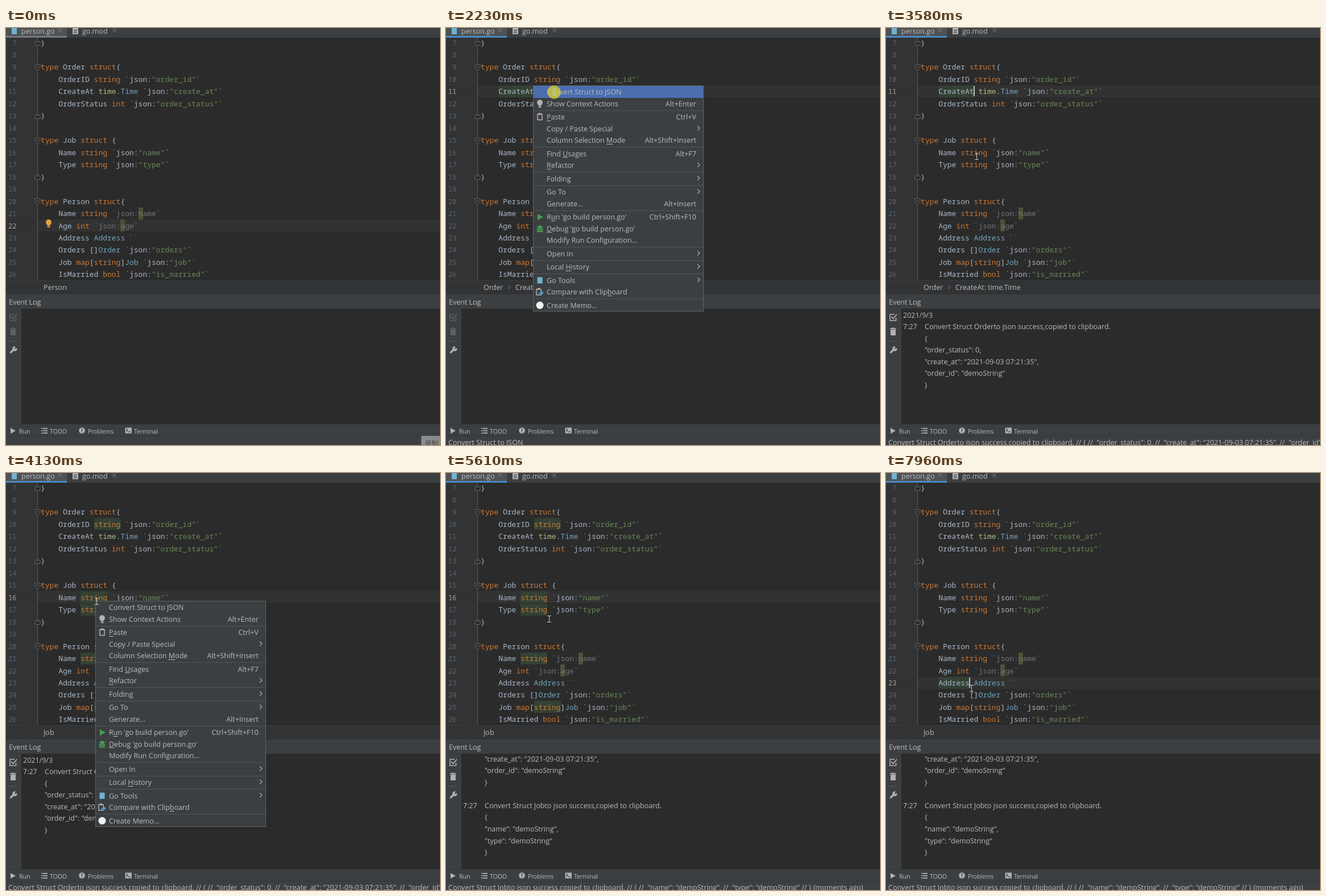
Recreate the animation shown at these times as an HTML page with a canvas. Size 763x734 px, loop 8000 ms.

```html
<!DOCTYPE html>
<html lang="en">
<head>
<meta charset="utf-8">
<title>Struct to JSON</title>
<style>
html, body { margin: 0; width: 100%; height: 100%; overflow: hidden; background: #2b2b2b; }
canvas { display: block; width: 763px; height: 734px; }
</style>
</head>
<body>
<canvas id="stage" width="763" height="734"></canvas>
<script>
const ctx = document.getElementById('stage').getContext('2d');
const LOOP = 8000;
const UI = '"Open Sans", "Noto Sans", sans-serif';
const MONO = '"Noto Sans Mono", "DejaVu Sans Mono", monospace';
const CHAR = 7.8, ROW = 21.47, LEFT = 61;
const C = {
  edit: '#2b2b2b', gutter: '#313335', panel: '#3c3f41', row: '#323232', line: '#555759',
  text: '#bbbbbb', code: '#a9b7c6', key: '#cc7832', type: '#6fa6c0', pkg: '#afbf7e',
  str: '#6a8759', dim: '#72737a', num: '#606366', icon: '#afb1b3', off: '#5e6163',
  use: '#344134', sel: '#4b6eaf', green: '#499c54', mark: '#6fb3d2'
};

// ~ marks a type, ^ marks a package
const CODE = [
  '}', '',
  'type Order struct{',
  '    OrderID string `json:"order_id"`',
  '    CreateAt ^time.~Time `json:"create_at"`',
  '    OrderStatus int `json:"order_status"`',
  '}', '',
  'type Job struct {',
  '    Name string `json:"name"`',
  '    Type string `json:"type"`',
  '}', '',
  'type Person struct{',
  '    Name string `json:name`',
  '    Age int `json:age`',
  '    Address ~Address ``',
  '    Orders []~Order `json:"orders"`',
  '    Job map[string]~Job `json:"job"`',
  '    IsMarried bool `json:"is_married"`'
];
const KEYWORDS = /^(type|struct|string|int|bool|map)$/;

// label, shortcut (> is a submenu), icon, separator after
const MENU = [
  ['Convert Struct to JSON'],
  ['Show Context Actions', 'Alt+Enter', 'bulb', 1],
  ['_Paste', 'Ctrl+V', 'paste'],
  ['Copy / Paste Special', '>'],
  ['Column Selection _Mode', 'Alt+Shift+Insert', '', 1],
  ['Find _Usages', 'Alt+F7'],
  ['_Refactor', '>', '', 1],
  ['Folding', '>', '', 1],
  ['Go To', '>'],
  ['Generate...', 'Alt+Insert', '', 1],
  ["R_un 'go build person.go'", 'Ctrl+Shift+F10', 'run'],
  ["_Debug 'go build person.go'", '', 'bug'],
  ['Modify Run Configuration...', '', '', 1],
  ['Open In', '>', '', 1],
  ['Local _History', '>', '', 1],
  ['Go Tools', '>', 'blue'],
  ['Compare with Clip_board', '', 'compare', 1],
  ['Create Memo...', '', 'white']
];

const LOG = [
  '2021/9/3', 'Convert Struct Orderto json success,copied to clipboard.',
  '{', '"order_status": 0,', '"create_at": "2021-09-03 07:21:35",', '"order_id": "demoString"', '}', '',
  'Convert Struct Jobto json success,copied to clipboard.',
  '{', '"name": "demoString",', '"type": "demoString"', '}'
];
const HINT = 'Convert Struct to JSON';
const note = (from, to) => LOG.slice(from, to).join(' // ').replace(/ "(\w+":)/g, '  "$1') + ' (moments ago)';

// timelines: [start, value]
const CURRENT = [[0, 22], [1360, 11], [3860, 16], [7840, 23]];
const CRUMB = [[0, 'Person'], [1700, 'Order>CreateAt: time.Time'], [4060, 'Job']];
const STATUS = [[0, ''], [1830, HINT], [2370, note(1, 7)], [4460, HINT], [5140, note(8, 13)]];
const POPUP = [[0, null], [1760, [153, 101]], [2300, null], [4060, [157, 225]], [5070, null]];
const HOVER = [[0, 0], [1830, 1], [2370, 0], [4460, 1], [5140, 0]];
const LOGGED = [[0, 0], [2370, 7], [5140, 13]];
const CARET = [[0, 0], [2370, 1], [2840, 0], [3340, 1], [3860, 0], [5680, 1], [6170, 0],
  [6640, 1], [7170, 0], [7640, 1]];
const PRESS = [[0, 0], [1360, 1], [1500, 0], [1660, 1], [1800, 0], [2230, 1], [2370, 0],
  [3860, 1], [4130, 0], [4930, 1], [5110, 0], [7840, 1], [7950, 0]];
const PATH = [
  [0, 760, 744], [810, 163, 174], [1220, 155, 102], [1800, 155, 102], [2160, 190, 113],
  [3090, 190, 113], [3580, 159, 226], [4390, 159, 226], [4670, 189, 241], [5540, 190, 242],
  [5610, 181, 257], [6170, 148, 360], [6240, 148, 360], [6560, 131, 681], [6770, 185, 610],
  [7100, 185, 610], [7700, 150, 379], [8000, 150, 379]
];

function at(list, t) {
  let v = list[0][1];
  for (const [start, value] of list) if (t >= start) v = value;
  return v;
}

function pointer(t) {
  const i = PATH.findIndex(p => p[0] > t);
  const [t0, x0, y0] = PATH[i - 1], [t1, x1, y1] = PATH[i];
  const u = (t - t0) / (t1 - t0), e = u * (2 - u);
  return [Math.round(x0 + (x1 - x0) * e), Math.round(y0 + (y1 - y0) * e)];
}

const rowY = n => 26 + (n - 7) * ROW;
const rowTop = n => Math.round(rowY(n) - 11);

function rect(x, y, w, h, color) {
  ctx.fillStyle = color;
  ctx.fillRect(x, y, w, h);
}

function text(s, x, y, color = C.text, size = 12.5, align = 'left', font = UI) {
  ctx.font = `${size}px ${font}`;
  ctx.textAlign = align;
  ctx.fillStyle = color;
  ctx.fillText(s, x, Math.round(y + 4.5));
}

function shape(points, color, fill, width = 1) {
  ctx.beginPath();
  for (let i = 0; i < points.length; i += 2) ctx.lineTo(points[i], points[i + 1]);
  paint(color, fill, width);
}

function paint(color, fill, width = 1) {
  if (fill) {
    ctx.fillStyle = color;
    ctx.fill();
  } else {
    ctx.strokeStyle = color;
    ctx.lineWidth = width;
    ctx.stroke();
  }
}

function disc(x, y, r, color) {
  ctx.beginPath();
  ctx.arc(x, y, r, 0, Math.PI * 2);
  paint(color, true);
}

function frame(x, y, w, h, color, width = 1) {
  ctx.strokeStyle = color;
  ctx.lineWidth = width;
  ctx.strokeRect(x, y, w, h);
}

function cross(x, y) {
  shape([x - 3.5, y - 3.5, x + 3.5, y + 3.5], '#7f8284');
  shape([x + 3.5, y - 3.5, x - 3.5, y + 3.5], '#7f8284');
}

const icons = {
  bulb(x, y, color = C.icon) {
    disc(x, y - 2, 5, color);
    rect(x - 2.5, y + 2, 5, 2, color);
    rect(x - 2.5, y + 5, 5, 2, color);
  },
  paste(x, y) {
    frame(x - 4, y - 5, 8, 10, C.icon, 1.6);
    rect(x - 2.5, y - 7, 5, 3, C.icon);
  },
  run: (x, y) => shape([x - 4, y - 5.5, x + 6, y, x - 4, y + 5.5], C.green, true),
  bug(x, y) {
    for (const d of [-3.5, 0.5, 4.5]) rect(x - 6, y + d, 12, 1.3, C.green);
    disc(x, y - 3, 3, C.green);
    disc(x, y + 2, 4.3, C.green);
    rect(x - 2, y + 0.2, 4, 1, C.panel);
    rect(x - 2, y + 2.7, 4, 1, C.panel);
  },
  blue: (x, y) => rect(x - 4.5, y - 5.5, 9, 11, C.mark),
  compare(x, y) {
    frame(x - 6, y - 5, 8, 10, C.icon, 1.5);
    rect(x - 4, y - 7, 4, 3, C.icon);
    shape([x - 2, y + 1, x + 2, y + 1, x + 2, y - 3, x + 7, y + 1.5, x + 2, y + 6, x + 2, y + 3, x - 2, y + 3], '#4a9bd0', true);
  },
  white: (x, y) => disc(x, y, 6.5, '#f2f2f2')
};

function drawTabs(focused) {
  rect(0, 0, 763, 17, C.panel);
  rect(0, 0, 107, 14, '#4e5254');
  rect(0, 14, 107, 3, focused ? '#4a88c7' : '#747a80');
  rect(10, 0, 9, 11, C.mark);
  text('person.go', 27, 5);
  cross(95, 4);
  rect(117, 0, 10, 11, C.icon);
  for (const y of [3, 5.5, 8]) rect(119, y, 6, 1, C.panel);
  text('go.mod', 134, 5);
  cross(190.5, 4);
}

function drawFold(y, up) {
  const d = up ? -1 : 1;
  ctx.beginPath();
  [[51, -5], [60, -5], [60, 1], [55.5, 5], [51, 1]].forEach(([x, dy]) => ctx.lineTo(x, y + dy * d));
  ctx.closePath();
  paint(C.edit, true);
  paint('#626567', false);
  rect(53, y - 1.5, 5, 1, '#747779');
}

function mark(n, col, len, color) {
  rect(Math.round(LEFT + col * CHAR), rowTop(n), Math.round(len * CHAR), 21, color);
}

function drawTag(tag, x, y) {
  if (!tag.includes('"')) return text(tag, x, y, C.dim, 13, 'left', MONO);
  for (const part of tag.split(/(json:)/)) {
    text(part, x, y, part === 'json:' ? C.code : C.str, 13, 'left', MONO);
    x += part.length * CHAR;
  }
}

function drawCode(line, y) {
  let x = LEFT;
  for (let tok of line.match(/`.*`|[~^]?\w+|[^\w`~^]+/g) || []) {
    if (tok[0] === '`') {
      drawTag(tok, x, y);
      continue;
    }
    let color = KEYWORDS.test(tok) ? C.key : C.code;
    if (tok[0] === '~') color = C.type;
    if (tok[0] === '^') color = C.pkg;
    tok = tok.replace(/[~^]/, '');
    if (tok.trim()) text(tok, x, y, color, 13, 'left', MONO);
    x += tok.length * CHAR;
  }
}

function drawEditor(t) {
  const cur = at(CURRENT, t);
  ctx.save();
  ctx.beginPath();
  ctx.rect(0, 17, 763, 427);
  ctx.clip();
  rect(0, 17, 763, 427, C.edit);
  rect(0, 17, 55, 427, C.gutter);
  rect(0, rowTop(cur), 763, 21, C.row);
  rect(55, 17, 1, 427, C.line);

  mark(21, 22, 1, '#52503a');
  mark(22, 18, 1, '#52503a');
  if (cur === 11) mark(11, 4, 8, C.use);
  if (cur === 16) [[10, 12], [16, 9], [17, 9], [21, 9], [25, 12]].forEach(([n, col]) => mark(n, col, 6, C.use));
  if (cur === 23) mark(23, 4, 7, C.use);

  CODE.forEach((line, i) => {
    const n = i + 7, y = rowY(n);
    const color = n === cur ? '#a4a3a3' : n === 21 ? '#566a80' : C.num;
    text(n, 18.5, y, color, 12, 'right', MONO);
    if (line === '}') drawFold(Math.round(y) - 0.5, true);
    if (line.startsWith('type')) drawFold(Math.round(y) + 0.5, false);
    drawCode(line, y);
  });
  if (cur === 22) icons.bulb(75, 344, '#e8a33d');
  if (at(CARET, t)) rect(cur === 23 ? 146 : 154, rowTop(cur) + 1, 2, 18, '#bbbbbb');
  ctx.restore();
}

function drawCrumbs(t) {
  rect(0, 444, 763, 25, C.gutter);
  rect(0, 444, 763, 1, '#3a3c3e');
  const [owner, field] = at(CRUMB, t).split('>');
  text(owner, 66, 456.5);
  if (field) {
    shape([110, 454, 112.5, 457, 110, 460], '#7a7d7f');
    text(field, 122, 456.5);
  }
}

function drawLog(t) {
  const count = at(LOGGED, t), color = count ? C.icon : C.off;
  rect(0, 468, 763, 27, C.panel);
  rect(0, 468, 763, 1, '#323435');
  text('Event Log', 5, 482);
  rect(0, 494, 763, 203, C.panel);
  rect(27, 494, 736, 203, C.edit);

  shape([15, 504, 7, 504, 7, 515, 17.5, 515, 17.5, 510], color, false, 1.6);
  shape([9.5, 508, 12.5, 511.5, 19, 504], color, false, 1.8);
  rect(8, 531, 9, 10, color);
  rect(7, 528.5, 11, 1.8, color);
  rect(10.5, 527.5, 4, 1.5, color);
  rect(4, 551, 18, 1, C.line);
  shape([7.5, 572, 14, 565.5], C.icon, false, 3.4);
  disc(15.5, 564.5, 4.2, C.icon);
  shape([15, 565, 17, 559, 21, 563], C.panel, true);

  ctx.save();
  ctx.beginPath();
  ctx.rect(28, 495, 735, 202);
  ctx.clip();
  const top = count > 7 ? 421 : 505;
  LOG.slice(0, count).forEach((s, i) => {
    const y = top + i * 20.55;
    text(s, i ? 68 : 30, y);
    if (s.startsWith('Convert')) text('7:27', 30, y);
  });
  ctx.restore();
}

function drawBars(t) {
  rect(0, 697, 763, 37, C.panel);
  rect(0, 697, 763, 1, '#323435');
  rect(0, 718, 763, 1, '#333537');
  shape([8, 704, 17, 709, 8, 714], C.icon, true);
  text('Run', 23, 709.5, C.text, 10.5);
  for (const y of [704, 708, 712]) {
    rect(62, y, 2, 1.8, C.icon);
    rect(65, y, 8, 1.8, C.icon);
  }
  text('TODO', 77, 709.5, C.text, 10.7);
  disc(133.5, 708.5, 5.3, C.icon);
  rect(132.7, 705, 1.6, 4.5, C.panel);
  rect(132.7, 710.5, 1.6, 1.6, C.panel);
  text('Problems', 144, 709.5, C.text, 10.2);
  rect(209.5, 703.5, 11.5, 10, C.icon);
  shape([211.5, 705.5, 214, 708, 211.5, 710.5], C.panel, false, 1.3);
  rect(215, 710, 4, 1.3, C.panel);
  text('Terminal', 225, 709.5, C.text, 10.4);
  text(at(STATUS, t), 4, 729);
}

function drawLabel(label, x, y) {
  const i = label.indexOf('_'), s = label.replace('_', '');
  text(s, x, y);
  if (i < 0) return;
  const start = ctx.measureText(s.slice(0, i)).width;
  rect(x + start, Math.round(y + 6), ctx.measureText(s[i]).width, 1, C.text);
}

function drawMenu(t) {
  const pos = at(POPUP, t);
  if (!pos) return;
  const [mx, my] = pos;
  rect(mx, my, 300, 398, C.panel);
  frame(mx + 0.5, my + 0.5, 299, 397, '#616365');
  if (at(HOVER, t)) rect(mx + 1, my + 1, 298, 21, C.sel);
  let y = my + 11.7;
  for (const [label, keys, icon, gap] of MENU) {
    if (icon) icons[icon](mx + 12, y);
    drawLabel(label, mx + 24, y);
    if (keys === '>') shape([mx + 289, y - 5, mx + 293, y - 1, mx + 289, y + 3], C.icon, false, 1.2);
    else if (keys) text(keys, mx + 287, y, C.text, 12.6, 'right');
    if (gap) rect(mx + 1, Math.round(y + 11.3), 298, 1, '#535657');
    y += 20.6 + (gap ? 2.8 : 0);
  }
}

function drawPointer(t) {
  if (t < 70) return;
  const [x, y] = pointer(t);
  if (at(PRESS, t)) disc(x, y, 11.8, 'rgba(222, 208, 48, 0.75)');
  if (y < 444 || (y > 495 && y < 697)) {
    const color = '#c8c8c8';
    rect(x, y - 6, 1, 12, color);
    for (const end of [y - 6, y + 5]) {
      rect(x - 3, end, 3, 1, color);
      rect(x + 1, end, 3, 1, color);
    }
  } else {
    const p = [0, 0, 0, 15, 3.5, 12, 6, 17, 8, 16, 5.7, 11, 10.5, 11, 0, 0];
    const moved = p.map((v, i) => v + (i % 2 ? y : x));
    shape(moved, '#ffffff', true);
    shape(moved, '#222222', false, 0.8);
  }
}

function draw(t) {
  drawEditor(t);
  drawTabs(t >= 1360);
  drawCrumbs(t);
  drawLog(t);
  drawBars(t);
  if (t < 140) {
    rect(730, 718, 33, 16, '#8b8b8b');
    text('录制', 736, 731, '#4a4a4a', 12, 'left', '"Noto Sans CJK SC", "Noto Sans CJK", sans-serif');
  }
  drawMenu(t);
  drawPointer(t);
}

const begin = performance.now();
function tick() {
  draw((performance.now() - begin) % LOOP);
  requestAnimationFrame(tick);
}
tick();
</script>
</body>
</html>
```
